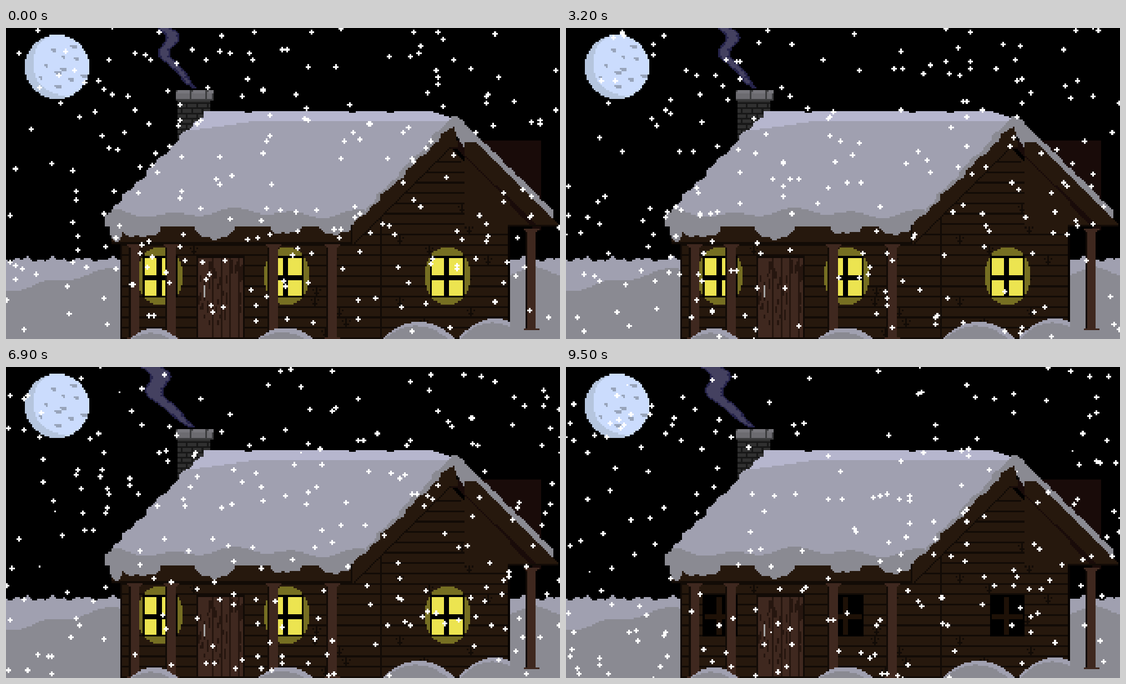
Animation, 998 px wide and 561 px high, one loop 9600 ms. Source, as an HTML page with a canvas:

```html
<!DOCTYPE html>
<html lang="en">
<head>
<meta charset="utf-8">
<title>Snowy cabin</title>
<style>
html, body { margin: 0; width: 100%; height: 100%; overflow: hidden; background: #000; }
canvas { display: block; width: 998px; height: 561px; image-rendering: pixelated; }
</style>
</head>
<body>
<canvas id="stage" width="320" height="180"></canvas>
<script>
const W = 320, H = 180;
const LOOP = 9600, STEP = 100, STEPS = LOOP / STEP, LIGHTS_OUT = 7600;
const PLANK = 6, EAVE = 115, APEX = 256;
const C = {
  snow: '#a0a0b0', bright: '#b6b6ce', shade: '#8a8a92',
  wall: '#26180d', seam: '#120b06', under: '#190b09', tile: '#2e1114',
  post: '#3f281f', grain: '#26160f', glow: '#766f22', pane: '#ece450'
};
const { sin, sqrt, round, floor, min, max, PI } = Math;

function rng(seed) {
  return () => {
    seed = (seed + 0x6d2b79f5) | 0;
    let t = Math.imul(seed ^ (seed >>> 15), 1 | seed);
    t ^= t + Math.imul(t ^ (t >>> 7), 61 | t);
    return ((t ^ (t >>> 14)) >>> 0) / 4294967296;
  };
}

const clamp = v => min(1, max(0, v));
const smooth = v => v * v * (3 - 2 * v);
const ripple = v => sin(v * 0.9) + sin(v * 0.37 + 1);

function rect(g, color, x, y, w, h) {
  g.fillStyle = color;
  g.fillRect(x, y, w, h);
}

// Fill from column l to column r, or from row top to row bottom.
function row(g, color, y, l, r) {
  l = round(l);
  rect(g, color, l, y, max(0, round(r) - l), 1);
}

function column(g, color, x, top, bottom = H) {
  top = round(top);
  rect(g, color, x, top, 1, max(0, round(bottom) - top));
}

function oval(g, color, cx, cy, rx, ry) {
  for (let y = floor(cy - ry); y < cy + ry; y++) {
    const half = rx * sqrt(max(0, 1 - ((y + 0.5 - cy) / ry) ** 2));
    row(g, color, y, cx - half, cx + half);
  }
}

function moon(g) {
  const cx = 29.5, cy = 22.5, r = 18.5;
  for (let y = 4; y < 41; y++) {
    const dy = y + 0.5 - cy, half = sqrt(max(0, r * r - dy * dy));
    row(g, '#b5c5de', y, cx - half, cx + half);
    row(g, '#cbdcfd', y, max(cx - half, cx + 4.5 - sqrt(max(0, r * r - (dy + 2) ** 2))), cx + half);
  }
  const rand = rng(5);
  for (let i = 0; i < 11; i++) {
    const a = i * 2.4, d = 4.4 * sqrt(i), w = 1 + floor(rand() * 3);
    const x = round(31 + d * Math.cos(a)), y = round(cy + d * sin(a));
    rect(g, '#98a4ba', x, y, w + 1, 1);
    rect(g, '#98a4ba', x + 1, y + 1, w, 1);
  }
}

function ground(g) {
  for (let x = 0; x < W; x++) {
    if (x >= 66 && x < 291) continue;
    const tone = x < 66 ? 152 - x * 0.2 : 139 + Math.abs(x - 303) * 0.2;
    column(g, C.snow, x, 133.7 + 0.8 * ripple(x));
    column(g, C.shade, x, tone + 1.2 * sin(x / 5));
  }
}

function chimney(g) {
  rect(g, '#303030', 99, 41, 19, 26);
  for (let y = 43; y < 67; y += 3) {
    rect(g, '#181818', 99, y, 19, 1);
    for (let x = 101 + y % 2 * 3; x < 118; x += 6) rect(g, '#181818', x, y, 1, 3);
  }
  rect(g, '#3c3c3e', 98, 36, 22, 6);
  for (let x = 98; x < 120; x += 9) {
    rect(g, '#6c6b70', x, 37, min(8, 119 - x), 4);
    rect(g, '#77767c', x + 1, 36, min(7, 119 - x), 2);
  }
}

function joint(g, x, y) {
  rect(g, C.seam, x, y, 1, PLANK);
  rect(g, C.seam, x - 1, y + 4, 3, 1);
  rect(g, C.seam, x - 2, y + 2, 1, 1);
  rect(g, C.seam, x + 2, y + 2, 1, 1);
}

function walls(g) {
  const rand = rng(31);
  rect(g, C.wall, 66, EAVE, 225, H - EAVE);
  for (let y = 68; y < EAVE; y++) row(g, C.wall, y, max(200, APEX - (y - 68)), min(291, APEX + (y - 68)));
  for (let y = 77; y < H; y += PLANK) {
    const l = max(217, APEX - (y - 70)), r = min(290, APEX + (y - 70));
    row(g, C.seam, y, l, r);
    if (y > 100) joint(g, floor(l + 8 + rand() * (r - l - 16)), y);
    if (y < EAVE) continue;
    row(g, C.seam, y, 67, 216);
    joint(g, floor(100 + rand() * 110), y);
  }
  column(g, C.seam, 66, 124);
  column(g, C.seam, 216, 108);
  column(g, '#080402', 290, 105, 174);
}

function windowAt(g, cx, lit) {
  if (lit) oval(g, C.glow, cx, 143.5, 13.3, 17);
  rect(g, '#000', cx - 10, 132, 20, 24);
  if (lit) rect(g, C.pane, cx - 9, 133, 18, 22);
  const bars = lit ? '#000' : '#1e1107';
  rect(g, bars, cx - 2, 133, 3, 22);
  rect(g, bars, cx - 9, 143, 18, 3);
}

function door(g) {
  rect(g, C.seam, 110, 132, 28, 48);
  rect(g, C.post, 111, 133, 26, 46);
  const rand = rng(12);
  for (let i = 0; i < 45; i++) {
    const x = 111 + floor(rand() * 26), y = 133 + floor(rand() * 38);
    column(g, C.grain, x, y, y + 2 + rand() * 6);
  }
  for (let x = 119; x < 137; x += 5) column(g, C.grain, x, 133, 179);
  column(g, '#a5a5a5', 114, 149, 156);
}

function post(g, x, top, bottom) {
  rect(g, C.seam, x - 3, top, 1, bottom - top);
  rect(g, C.post, x - 2, top, 5, bottom - top);
  rect(g, C.post, x - 4, top, 9, 1);
  rect(g, C.post, x - 3, top + 1, 7, 1);
  rect(g, C.post, x - 4, bottom - 1, 9, 1);
}

// Snow lobes over the eave: centre, half width, depth.
const lobes = [[63, 4, 9], [77, 12, 6], [120, 12, 7], [161, 9, 4], [190, 10, 4]];

function roof(g) {
  rect(g, C.wall, 61, EAVE, 139, 10);
  rect(g, C.seam, 61, 124, 139, 1);
  for (let x = 88; x < 190; x += 41) rect(g, C.tile, x, 112, 20, 3);

  for (let y = 48; y < EAVE; y++) {
    const wobble = 0.8 * ripple(y);
    const left = max(57, 115 - (y - 48) * 0.96 + wobble);
    const right = y < 57 ? min(259, 247 + (y - 48) * 3) : 257 - (y - 57) + wobble;
    row(g, C.shade, y, left, right);
    const lit = min(right, APEX - (y - 52) * 0.93 + wobble);
    for (let x = round(left); x < lit; x++) {
      if (y < 54 + max(0, (140 - x) / 7)) rect(g, C.bright, x, y, 1, 1);
      else if (y < 106.5 + 1.5 * ripple(x / 5)) rect(g, C.snow, x, y, 1, 1);
    }
  }
  for (const [cx, half, depth] of lobes)
    for (let x = cx - half; x <= cx + half; x++)
      column(g, C.shade, x, EAVE - 1, EAVE + depth * sqrt(1 - ((x - cx) / half) ** 2) + 0.5 * ripple(x));
  for (const x of [138, 198, 220]) rect(g, '#000', x, 48, 4, 1);
}

function gable(g) {
  // right slope, drawn by column: snow, board, soffit
  for (let x = 257; x < 319; x++) {
    const d = x - 257;
    if (x > 264) column(g, C.wall, x, 66 + max(0, x - 271), EAVE);
    if (x < 309) column(g, C.under, x, 65 + max(0, 260 - x), min(EAVE, max(70, 67 + d)) + (x > 290 ? 2 : 0));
    if (x > 264) column(g, C.wall, x, 66 + max(0, x - 271), min(EAVE, 66 + d * 0.98));
    if (x < 316) column(g, C.shade, x, 51 + max(0, x - 260) * 0.98 + 0.3 * ripple(x), x < 265 ? 58 + d * 1.5 : 66 + max(0, x - 271));
  }
  rect(g, C.seam, 290, 114, 29, 1);
  // left board, between the snow edge and the seam
  for (let y = 57; y < 125; y++) {
    const l = max(200, 257 - (y - 57) + 0.8 * ripple(y)), seam = APEX - (y - 69);
    row(g, C.wall, y, l, y < 69 ? 259 + (y - 57) * 0.2 : seam);
    if (y >= 69) rect(g, C.seam, seam, y, 1, 1);
  }
  column(g, C.seam, 199, 114, 125);
}

function mound(g, x0, w, h) {
  for (let x = x0; x < min(x0 + w, 291); x++) {
    const u = (x - x0) / w, rise = h * sin(PI * u) ** 0.8;
    column(g, C.snow, x, H - rise);
    column(g, C.shade, x, H - rise + 1 + 3 * u);
  }
}

function scene(lit) {
  const c = document.createElement('canvas');
  c.width = W;
  c.height = H;
  const g = c.getContext('2d');
  rect(g, '#000', 0, 0, W, H);
  moon(g);
  ground(g);
  chimney(g);
  walls(g);
  for (const x of [89, 162, 255]) windowAt(g, x, lit);
  door(g);
  roof(g);
  gable(g);
  for (const x of [74, 95, 154, 188]) post(g, x, 125, H);
  post(g, 303, 116, 175);
  mound(g, 71, 28, 6);
  mound(g, 145, 32, 6.5);
  mound(g, 217, 42, 10);
  mound(g, 261, 42, 12);
  return c;
}

// The plume leans left late in the loop and swells once before that.
function smoke(g, t) {
  const lean = smooth(clamp((t - 5200) / 1400));
  const swell = max(lean, Math.exp(-(((t - 2300) / 450) ** 2)));
  for (let y = 0; y < 35; y++) {
    const u = y / 35, fade = sqrt(1 - u);
    const x = 92 + 18 * u ** 2.5 + 5 * (1 - u) * sin(2 * PI * u / 0.6) - 7.5 * lean * fade;
    const half = 1 + (3.3 + 2.2 * swell) * fade;
    row(g, '#25234a', y, x - half, x + half);
    if (half > 2) row(g, '#444160', y, x - half + 1.2, x + half - 1.2 - (y % 4 === 0));
  }
}

// One long sheet of flakes slides past the stage.
const rand = rng(2024);
const flakes = Array.from({ length: 1150 }, () => {
  const x = floor(rand() * (W + 2 * STEPS));
  const y = floor(rand() * (H + 4 * STEPS)) - 4 * STEPS;
  return { x, y, dot: y < -125 && rand() < 0.03 };
});

function snow(g, step) {
  for (const f of flakes) {
    const x = f.x - 2 * step, y = f.y + 4 * step;
    if (x < -1 || x > W || y < -1 || y > H) continue;
    rect(g, '#fff', x, y, 1, 1);
    if (f.dot) continue;
    g.fillRect(x - 1, y, 3, 1);
    g.fillRect(x, y - 1, 1, 3);
  }
}

const ctx = document.getElementById('stage').getContext('2d');
const litScene = scene(true), darkScene = scene(false);
const start = performance.now();

function frame() {
  const step = floor((performance.now() - start) % LOOP / STEP);
  const t = step * STEP;
  ctx.drawImage(t < LIGHTS_OUT ? litScene : darkScene, 0, 0);
  smoke(ctx, t);
  snow(ctx, step);
  requestAnimationFrame(frame);
}
frame();
</script>
</body>
</html>
```
